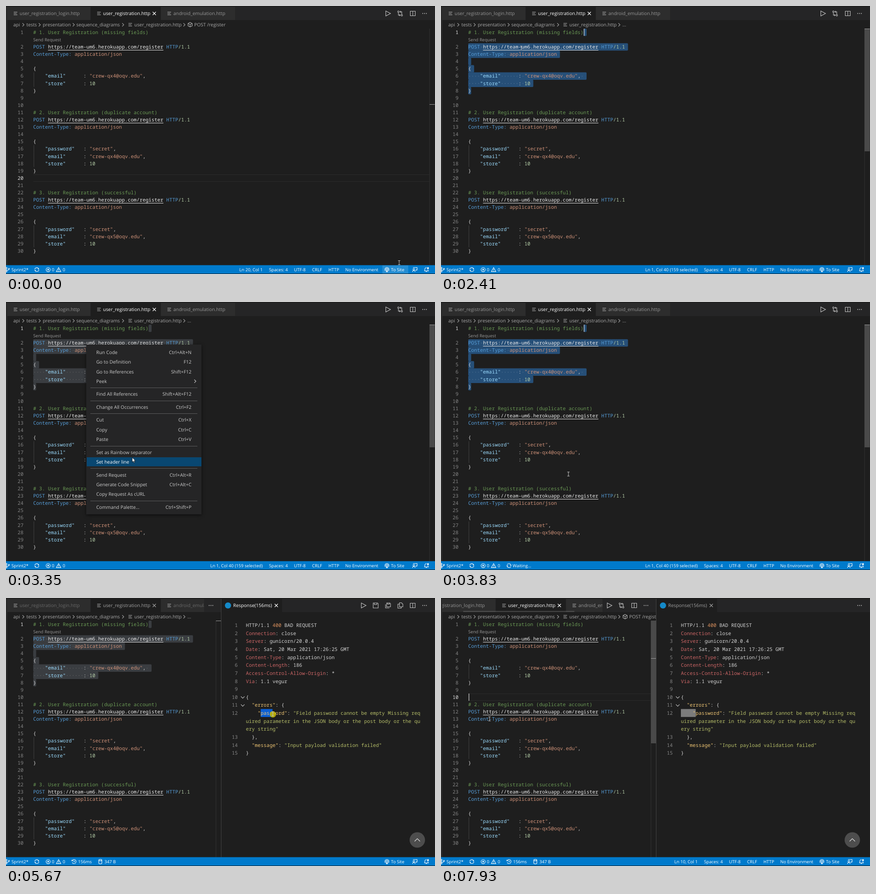
These frames come from a looping animation (946x592 px, 8 s). An HTML page with a canvas:

```html
<!DOCTYPE html>
<html lang="en">
<head>
<meta charset="utf-8">
<title>HTTP requests in an editor</title>
<style>
html, body { margin: 0; width: 100%; height: 100%; overflow: hidden; background: #1e1e1e; }
canvas { display: block; }
</style>
</head>
<body>
<canvas id="stage" width="946" height="592"></canvas>
<script>
const ctx = document.getElementById('stage').getContext('2d');
const LOOP = 8000, CW = 6.525, ROW = 16.1, X0 = 60, RX = 529;
const MONO = '500 10.875px "Noto Sans Mono", monospace';
const SANS = '"Open Sans", "Noto Sans", sans-serif';

// moments of hard changes
const PRESS = 930, TOP = 1500, MENU = 2490, SEND = 3750, OPEN = 4170, GRAB = 5440, FLIP = 6690, CLICK = 7600;

const mouse = [
  [0, 867, 567], [70, 867, 567], [400, 731, 488], [830, 72, 196], [930, 66, 187], [1100, 57, 150],
  [1320, 47, 85], [1780, 47, 82], [2400, 177, 93], [2650, 177, 93], [2960, 285, 188], [3430, 277, 375],
  [3520, 277, 375], [3590, 281, 380], [3900, 281, 380], [4320, 590, 300], [4560, 590, 300],
  [4780, 614, 286], [5050, 598, 264], [5360, 562, 255], [5440, 562, 255], [5670, 588, 256],
  [6210, 872, 253], [6290, 877, 250], [6460, 881, 246], [6610, 881, 246], [6850, 831, 244],
  [7200, 420, 217], [7380, 168, 215], [7450, 124, 214], [7600, 124, 214], [7930, 107, 267], [8000, 107, 267]
];

const ink = {
  c: '#6a9955', b: '#569cd6', w: '#ececec', n: '#b5cea8', s: '#ce9178', k: '#9cdcfe', p: '#d4d4d4',
  r: '#cc6666', o: '#de935f', y: '#f0c674', g: '#b5bd68'
};

const icon = {
  lines: 'M-4 -3H4M-4 0H2.5M-4 3H4',
  close: 'M-3.5 -3.5L3.5 3.5M3.5 -3.5L-3.5 3.5',
  play: 'M-4.5 -5.5L6 0L-4.5 5.5Z',
  compare: 'M-5.4 -4a1.7 1.7 0 1 0 3.4 0a1.7 1.7 0 1 0 -3.4 0M-3.7 -2.3V3.8H0M-1.7 2L.2 3.8L-1.7 5.6M2 4a1.7 1.7 0 1 0 3.4 0a1.7 1.7 0 1 0 -3.4 0M3.7 2.3V-3.8H0M1.7 -5.6L-.2 -3.8L1.7 -2',
  split: 'M-5.5 -5H5.5V5H-5.5ZM0 -5V5',
  save: 'M-5.5 -5.5H4L5.5 -4V5.5H-5.5ZM-3 -5.5V-2H2.5V-5.5',
  saveAll: 'M-3 -5.5H4L5.5 -4V3H-3ZM-1 -5.5V-3H3V-5.5M-5.5 -2.5V5.5H3',
  copy: 'M-2 -6H2.5L5.5 -3V3H-2ZM-2 -3H-5.5V6H2V3',
  right: 'M-1.8 -3.6L1.8 0L-1.8 3.6',
  down: 'M-4 -2L0 2L4 -2',
  up: 'M-6 3L0 -3L6 3',
  cube: 'M0 -5L4.6 -2.6V2.6L0 5L-4.6 2.6V-2.6ZM-4.6 -2.6L0 0L4.6 -2.6M0 0V5',
  branch: 'M-3.4 -3.5a1.4 1.4 0 1 0 2.8 0a1.4 1.4 0 1 0 -2.8 0M-3.4 3.8a1.4 1.4 0 1 0 2.8 0a1.4 1.4 0 1 0 -2.8 0M2 -1.6a1.4 1.4 0 1 0 2.8 0a1.4 1.4 0 1 0 -2.8 0M-2 -2V2.3M3.4 -.2Q3 1.3 -2 1.6',
  sync: 'M-4.6 -.6A4.6 4.2 0 0 1 4.2 -1.6M4.6 .6A4.6 4.2 0 0 1 -4.2 1.6M2.2 -1.2H5M-2.2 1.2H-5',
  error: 'M-4.6 0a4.6 4.6 0 1 0 9.2 0a4.6 4.6 0 1 0 -9.2 0M-1.8 -1.8L1.8 1.8M1.8 -1.8L-1.8 1.8',
  warn: 'M0 -4.5L5 4.3H-5ZM0 -1.5V1.5M0 2.3V3.3',
  clock: 'M-4 -2A4.5 4.5 0 1 1 -4 2M-4.8 -4V-1.6H-2.4M0 -2.5V.5H2.2',
  store: 'M-3.4 -3.4A3.4 1.5 0 0 1 3.4 -3.4A3.4 1.5 0 0 1 -3.4 -3.4V3.5A3.4 1.5 0 0 0 3.4 3.5V-3.4',
  mast: 'M-3 3A4.5 4.5 0 1 1 3 3M-1.6 1A2.2 2.2 0 1 1 1.6 1M0 -.8V5M-1 2V5H1V2',
  person: 'M-4 -.5a1.8 1.8 0 1 0 3.6 0a1.8 1.8 0 1 0 -3.6 0M-5 5Q-5 2 -2.2 2Q.6 2 .6 5M-4 -4.5H5V.8H3L1.4 2.4',
  bell: 'M-4.5 3H4.5L3.4 1.2V-1M.6 -4.2Q-3.4 -4.6 -3.4 -.6V1.2L-4.5 3M-1.2 3.4Q0 5.6 1.2 3.4'
};

const pair = (key, val, type, end) => {
  const head = `    "${key}"`;
  return [[head, 'k'], [' '.repeat(17 - head.length) + ': ', 'p'], [val, type], [end, 'p']];
};
const request = (title, body) => [
  [[title, 'c']],
  [['POST ', 'b'], ['https://team-um6.herokuapp.com/register', 'w'], [' HTTP', 'b'], ['/1.1', 'n']],
  [['Content-Type: ', 'b'], ['application/json', 's']],
  [], [['{', 'p']], ...body, [['}', 'p']]
];
const secret = pair('password', '"secret"', 's', ',');
const store = pair('store', '10', 'n', '');
const mail = (a, end) => pair('email', `"${a}"`, 's', end);
const doc = [
  ...request('# 1. User Registration (missing fields)', [mail('crew-qx4@oqv.edu', ', '), store]), [], [],
  ...request('# 2. User Registration (duplicate account)', [secret, mail('crew-qx4@oqv.edu', ','), store]), [], [],
  ...request('# 3. User Registration (successful)', [secret, mail('crew-qx5@oqv.edu', ','), store])
];
const plain = doc.map(l => l.map(p => p[0]).join(''));

const head = (k, v) => [[k, 'r'], [': ' + v, 'p']];
const reply = [
  [1, [['HTTP/1.1 ', 'p'], ['400', 'o'], [' BAD REQUEST', 'p']]],
  [2, head('Connection', 'close')],
  [3, head('Server', 'gunicorn/20.0.4')],
  [4, head('Date', 'Sat, 20 Mar 2021 17:26:25 GMT')],
  [5, head('Content-Type', 'application/json')],
  [6, head('Content-Length', '186')],
  [7, head('Access-Control-Allow-Origin', '*')],
  [8, head('Via', '1.1 vegur')],
  [9, []],
  [10, [['{', 'p']]],
  [11, [['  "errors"', 'y'], [': {', 'p']]],
  [12, [['    "password"', 'y'], [': ', 'p'], ['"Field password cannot be empty Missing req', 'g']]],
  ['', [['uired parameter in the JSON body or the post body or the qu', 'g']]],
  ['', [['ery string"', 'g']]],
  [13, [['  },', 'p']]],
  [14, [['  "message"', 'y'], [': ', 'p'], ['"Input payload validation failed"', 'g']]],
  [15, [['}', 'p']]]
];

const menu = [
  ['Run Code', 'Ctrl+Alt+N'], ['Go to Definition', 'F12'], ['Go to References', 'Shift+F12'], ['Peek', '>'], 0,
  ['Find All References', 'Shift+Alt+F12'], 0, ['Change All Occurrences', 'Ctrl+F2'], 0,
  ['Cut', 'Ctrl+X'], ['Copy', 'Ctrl+C'], ['Paste', 'Ctrl+V'], 0,
  ['Set as Rainbow separator', ''], ['Set header line', ''], 0,
  ['Send Request', 'Ctrl+Alt+R'], ['Generate Code Snippet', 'Ctrl+Alt+C'], ['Copy Request As cURL', ''], 0,
  ['Command Palette...', 'Ctrl+Shift+P']
];

const lineY = n => n === 1 ? 58 : 90.2 + (n - 2) * ROW;
const replyY = i => 60.3 + i * 17.63;

function box(x, y, w, h, color, r = 0) {
  ctx.fillStyle = color;
  ctx.beginPath();
  ctx.roundRect(x, y, w, h, r);
  ctx.fill();
}
function put(str, x, y, color, font, align = 'left') {
  ctx.font = font;
  ctx.textRendering = 'geometricPrecision';
  ctx.textAlign = align;
  ctx.fillStyle = color;
  ctx.fillText(str, x, Math.round(y + 3.8));
}
const ui = (str, x, y, color = '#ccc', align) => put(str, x, y, color, '10.4px ' + SANS, align);
const small = (str, x, y, color = '#fff', align) => put(str, x, y, color, '9.6px ' + SANS, align);
function code(parts, x, y) {
  let col = 0;
  for (const [str, type] of parts) {
    put(str, x + col * CW, y, ink[type], MONO);
    col += str.length;
  }
}
function draw(d, x, y, color = '#c5c5c5', w = 1.1, fill = null, turn = 0) {
  const p = new Path2D(d);
  ctx.save();
  ctx.translate(x, y);
  ctx.rotate(turn);
  if (fill) { ctx.fillStyle = fill; ctx.fill(p); }
  ctx.strokeStyle = color;
  ctx.lineWidth = w;
  ctx.stroke(p);
  ctx.restore();
}
function disc(x, y, r, color) {
  ctx.fillStyle = color;
  ctx.beginPath();
  ctx.arc(x, y, r, 0, 7);
  ctx.fill();
}
function dots(x, y, color = '#c5c5c5') {
  for (let i = -1; i < 2; i++) disc(x + i * 4, y, 1, color);
}
function clip(x, y, w, h, fn) {
  ctx.save();
  ctx.beginPath();
  ctx.rect(x, y, w, h);
  ctx.clip();
  fn();
  ctx.restore();
}

function mouseAt(t) {
  let i = 1;
  while (i < mouse.length - 1 && mouse[i][0] < t) i++;
  const [a, x, y] = mouse[i - 1], [b, u, v] = mouse[i];
  const k = Math.min(1, (t - a) / (b - a));
  return { x: x + (u - x) * k, y: y + (v - y) * k };
}

// caret place and number of selected characters at time t
function caretAt(t) {
  if (t < PRESS) return { line: 20, col: 0, sel: 0 };
  if (t >= CLICK) return { line: 10, col: 0, sel: 0 };
  let line = 1, col = 39;
  if (t < TOP) {
    const m = mouseAt(t);
    line = Math.max(2, Math.min(8, Math.round((m.y - 90.2) / ROW) + 2));
    col = Math.max(0, Math.min(plain[line - 1].length, Math.round((m.x - X0) / CW)));
  }
  let sel = 1 - col;
  for (let n = line; n < 8; n++) sel += plain[n - 1].length + 2;
  return { line, col, sel };
}

function tabs(split, focus) {
  const limit = !split ? 830 : focus ? 356 : 437;
  const shift = split && focus ? -66 : 0;
  const dim = focus ? '#969696' : '#686868', lit = focus ? '#fff' : '#a0a0a0';
  box(0, 2, 946, 29, '#252526');
  clip(3, 2, limit - 3, 29, () => {
    box(3 + shift, 2, 183, 29, '#2d2d2d');
    box(187 + shift, 2, 154, 29, '#1e1e1e');
    box(342 + shift, 2, 163, 29, '#2d2d2d');
    const items = [['user_registration_login.http', 21, dim], ['user_registration.http', 205, lit], ['android_emulation.http', 360, dim]];
    for (const [name, x, color] of items) {
      draw(icon.lines, x + shift, 16.5, '#b5b5b5');
      ui(name, x + 9 + shift, 16.5, color);
    }
    draw(icon.close, 327 + shift, 16.5, lit, 1.2);
    if (shift) box(49, 28.5, 245, 2.5, 'rgba(121,121,121,.4)');
  });
  if (focus) {
    const x = split ? 371 : 842;
    draw(icon.play, x, 16.5);
    draw(icon.compare, x + 27, 16.5);
    draw(icon.split, x + 55, 16.5);
  }
  dots(split ? 452 : 923, 16.5);
}

function crumbs(t, W) {
  const gray = '#a9a9a9';
  clip(3, 31, W - 3, 20, () => {
    for (const [name, x] of [['api', 16], ['tests', 45], ['presentation', 81], ['sequence_diagrams', 155], ['user_registration.http', 283]])
      ui(name, x, 41.2, gray);
    for (const x of [38, 74, 149, 258, 393]) draw(icon.right, x, 41.5, gray);
    draw(icon.lines, 274, 41.2, '#b5b5b5');
    if (t >= TOP && t < CLICK) ui('...', 400, 41.2, gray);
    else {
      draw(icon.cube, 406, 41.2, '#b0b0b0');
      ui('POST /register', 415, 41.2, gray);
    }
  });
}

function editor(t, m, split, focus) {
  const W = split ? 474 : 946, c = caretAt(t);
  const live = focus && !(t >= MENU && t < SEND);
  if (!c.sel) {
    const y = Math.round(lineY(c.line) - ROW / 2), w = W - X0 - (split ? 0 : 12);
    box(X0, y, w, 1, '#2b2b2b');
    box(X0, y + 15, w, 1, '#2b2b2b');
  }
  const selected = n => c.sel && n >= c.line && n <= 8;
  doc.forEach((parts, i) => {
    const n = i + 1, y = lineY(n), len = plain[i].length;
    if (plain[i].startsWith('    ') && !selected(n)) box(61, y - ROW / 2, 1, ROW, '#404040');
    if (selected(n)) {
      const from = n === c.line ? c.col : 0, to = n === 8 ? 1 : len + 1;
      if (to > from) box(X0 + from * CW, y - ROW / 2, (to - from) * CW, ROW + .3, live ? '#264f78' : '#3a3d41', 2);
      for (let k = from; k < len; k++)
        if (plain[i][k] === ' ') disc(X0 + (k + .5) * CW, y + .5, .65, live ? '#6c88a3' : '#777');
    }
    put(String(n), 38.5, y, n === c.line ? '#e0e0e0' : '#858585', MONO, 'right');
    code(parts, X0, y);
    if (plain[i].startsWith('POST')) box(X0 + 5 * CW, Math.round(y + 7), 39 * CW, 1, ink.w);
  });
  small('Send Request', 60, 74.5, '#999');
  if (m.x < 58 && t > 800 && t < 2000)
    for (const n of [5, 15, 26]) draw(icon.down, 51, lineY(n));

  const on = t < PRESS ? t > 330 && t < 830 : t < MENU ? t < 1800 || t % 1000 < 500 : live;
  if (on) box(Math.round(X0 + .5 + c.col * CW), lineY(c.line) - ROW / 2, 1.2, ROW, '#d8d8d8');

  const rx = split ? 463 : 934;
  box(rx - .5, 50, 1, 523, '#333');
  const hover = split ? t > 7150 : t > 120;
  if (hover) box(rx, 50, 11.5, 271, '#4a4a4a');
  box(rx, c.line === 1 ? 50 : Math.round(49 + c.line * 8.4), 11.5, 1, '#a0a0a0');
}

function response(t, focus) {
  box(474, 2, 472, 571, '#1e1e1e');
  box(475, 2, 471, 29, '#252526');
  box(475, 2, 134, 29, '#1e1e1e');
  box(474, 2, 1, 571, '#444');
  disc(489.5, 16.5, 6.8, '#1489c8');
  const lit = focus ? '#fff' : '#a0a0a0';
  ui('Response(156ms)', 501, 16.5, lit);
  draw(icon.close, 596, 16.5, lit, 1.2);
  if (focus) ['play', 'save', 'saveAll', 'copy', 'split'].forEach((k, i) => draw(icon[k], 788 + i * 27.2, 16.5));
  dots(923, 16.5);

  if (t >= GRAB) {
    const col = Math.round((mouseAt(t).x - RX) / CW);
    const [a, b] = t < FLIP ? [5, Math.max(5, Math.min(59, col))] : [0, 5];
    box(RX + a * CW, replyY(11) - 9, (b - a) * CW, 17.6, focus ? '#0a5fd6' : '#7c7c7c');
  }
  reply.forEach(([n, parts], i) => {
    put(String(n), 511, replyY(i), '#858585', MONO, 'right');
    code(parts, RX, replyY(i));
  });
  for (const i of [9, 10]) draw(icon.down, 522, replyY(i) + .5);
  disc(907, 534.5, 17, '#4d4d4d');
  draw(icon.up, 907, 534.5, '#e0e0e0', 1.2);
}

function status(t, split, focus) {
  const y = 582.3;
  box(0, 572.5, 946, 18.5, '#007acc');
  box(0, 591, 946, 1, '#10202c');
  if (t < 110) box(830, 573, 57, 18, 'rgba(255,255,255,.14)');
  const mark = (k, x, turn) => draw(icon[k], x, y, '#fff', 1.1, null, turn);
  mark('branch', 3);
  small('Sprint2*', 12, y);
  mark('sync', 68);
  mark('error', 93);
  small('0', 101, y);
  mark('warn', 116);
  small('0', 125, y);
  if (split) {
    mark('clock', 150);
    small('156ms', 159, y);
    mark('store', 208);
    small('347 B', 217, y);
  } else if (t >= SEND) {
    mark('sync', 150, (t - SEND) / 240);
    small('Waiting...', 158, y);
  }
  if (focus) {
    const c = caretAt(t);
    small(`Ln ${c.line}, Col ${c.col + 1}` + (c.sel > 0 ? ` (${c.sel} selected)` : ''), 566, y, '#fff', 'right');
    for (const [s, x] of [['Spaces: 4', 580], ['UTF-8', 635], ['CRLF', 675], ['HTTP', 711], ['No Environment', 748]]) small(s, x, y);
  }
  mark('mast', 840);
  small('To Site', 849, y);
  mark('person', 901.5);
  mark('bell', 927);
  disc(930.5, 579, 2, '#fff');
}

function popup(t, m) {
  ctx.save();
  ctx.shadowColor = 'rgba(0,0,0,.6)';
  ctx.shadowBlur = 7;
  ctx.shadowOffsetY = 2;
  box(177, 94, 254, 375, '#252526');
  ctx.restore();
  let y = 111, pick = -1;
  const ys = menu.map((item, i) => {
    if (!item) { y += 7.2; return y - 14.4; }
    const at = y;
    if (t > 2700 && m.y >= at - 10.5) pick = i;
    y += 21.35;
    return at;
  });
  menu.forEach((item, i) => {
    const at = ys[i];
    if (!item) return box(186, Math.round(at), 236, 1, '#5c5c5d');
    if (i === pick) box(178, Math.round(at - 10), 253, 20, '#094771');
    const color = i === pick ? '#fff' : '#ccc';
    ui(item[0], 199, at, color);
    if (item[1] === '>') draw(icon.right, 417, at, color, 1.2);
    else ui(item[1], 409, at, color, 'right');
  });
}

function pointer(t, m) {
  const within = (a, b) => t >= a && t < b;
  if (within(PRESS, 1680) || within(GRAB, FLIP) || within(7560, 7680)) disc(m.x, m.y + 1, 7, 'rgba(196,184,0,.85)');
  const arrow = within(MENU, SEND) || within(OPEN, 5100) || (within(6610, 7400) && m.x > 474) || m.x < 58;
  if (arrow) draw('M0 0V10L2.4 7.9L4 11.5L5.6 10.8L4 7.3H7Z', m.x, m.y, '#111', .8, '#fff');
  else draw('M-2.5 -4.5H2.5M0 -4.5V4.5M-2.5 4.5H2.5', m.x, m.y, '#c8c8c8', 1);
}

function render(t) {
  const m = mouseAt(t), split = t >= OPEN, focus = !split || t >= CLICK;
  box(0, 0, 946, 592, '#1e1e1e');
  tabs(split, focus);
  crumbs(t, split ? 474 : 946);
  editor(t, m, split, focus);
  if (split) response(t, !focus);
  box(0, 2, 3, 571, '#292929');
  status(t, split, focus);
  if (t >= MENU && t < SEND) popup(t, m);
  pointer(t, m);
}

const start = performance.now();
function tick() {
  render((performance.now() - start) % LOOP);
  requestAnimationFrame(tick);
}
tick();
</script>
</body>
</html>
```
